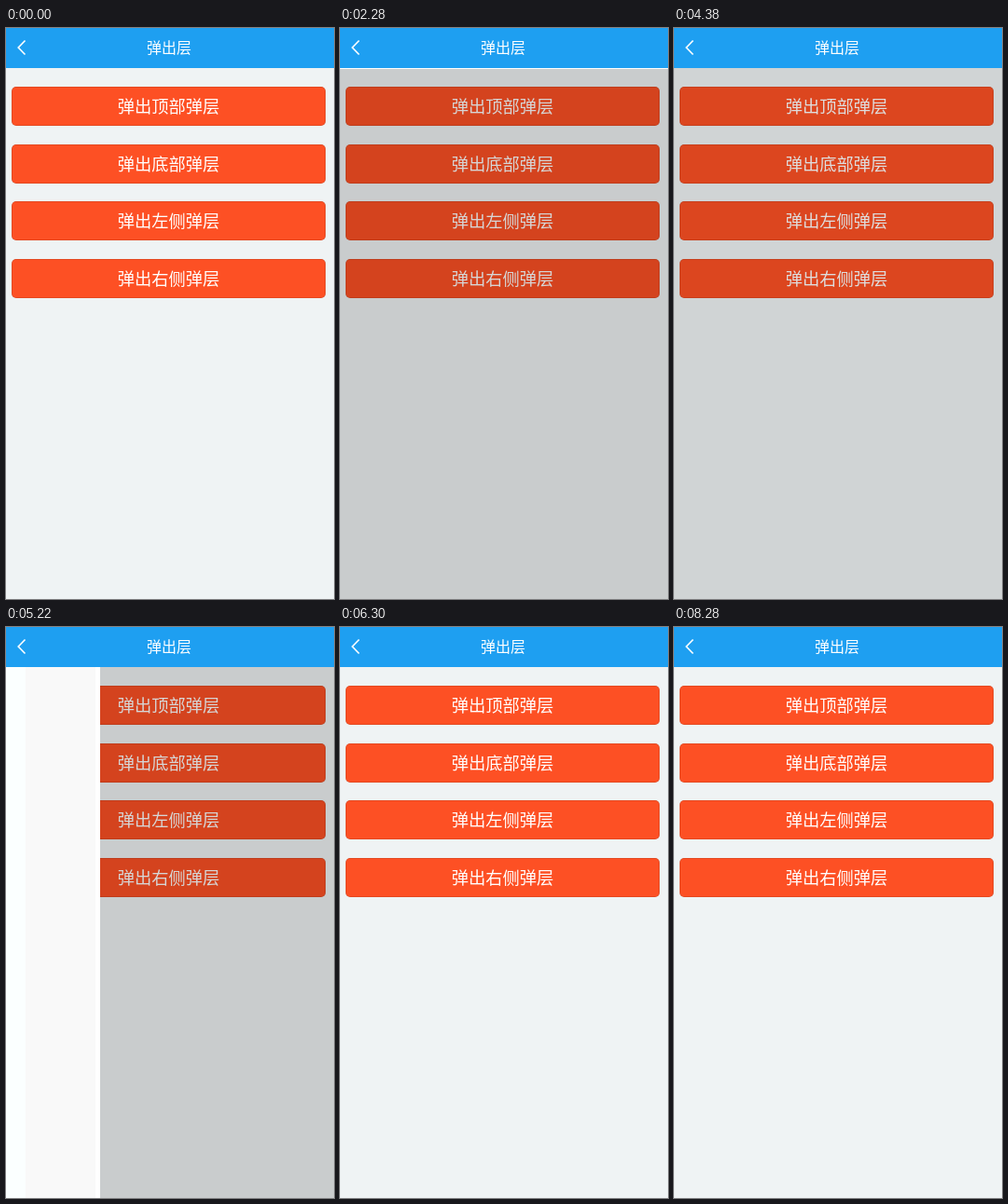
These frames come from a looping animation (352x613 px, 8.58 s). An HTML page:

```html
<!DOCTYPE html>
<html lang="zh-CN">
<head>
<meta charset="utf-8">
<title>弹出层</title>
<style>
  html, body { margin: 0; width: 100%; height: 100%; overflow: hidden; }
  body {
    position: relative;
    background: #eff3f4;
    color: #fff;
    font-family: "Noto Sans CJK SC", "Noto Sans CJK", "Noto Sans", sans-serif;
  }
  header {
    position: absolute; left: 0; top: 0; width: 352px; height: 43px;
    background: #1e9ff1;
    font-size: 16px; font-weight: 500; line-height: 43px;
  }
  header span { position: absolute; left: 151px; top: -1px; white-space: nowrap; }
  header svg { position: absolute; left: 0; top: 0; }
  .btn {
    position: absolute; left: 6px; width: 337px; height: 42px;
    border-radius: 5px;
    background: #fd5024;
    box-shadow: inset 0 0 0 .5px rgba(0, 0, 0, .2);
    font-size: 18.3px; font-weight: 300; line-height: 41px;
    text-align: center; white-space: nowrap;
  }
  #mask, .panel { position: absolute; left: 0; top: 43px; width: 352px; height: 570px; }
  #mask { background: #000; opacity: 0; }
  .panel { background: #fff; }
  .top {
    height: 404px;
    background: linear-gradient(#fff 73px, #f7faf9 73px 135px, #fffff8 135px 241px, #fff 241px);
  }
  .bottom { top: 209px; height: 404px; }
  .left {
    width: 246px;
    background: linear-gradient(90deg, #fbffff 21px, #f9f9f9 21px 96px, #fff 96px);
  }
  .right { left: 106px; width: 246px; }
  .tap {
    position: absolute; width: 26px; height: 26px; margin: -13px;
    border-radius: 50%;
    background: rgba(255, 255, 255, .35);
    opacity: 0;
  }
</style>
</head>
<body>
<header>
  <svg width="30" height="43" fill="none" stroke="#fff" stroke-width="1.6"><path d="M20.5 13.5 13.2 21 20.5 28.5"/></svg>
  <span>弹出层</span>
</header>
<script>
const LOOP = 8580, OPEN = 300, CLOSE = 270, FADE = 60, DIM = 0.16;

// side, hidden clip, opening start, closing start
const popups = [
  ['top', 'inset(0 0 100% 0)', 750, 2020],
  ['bottom', 'inset(100% 0 0 0)', 3060, 4100],
  ['left', 'inset(0 100% 0 0)', 5087, 5960],
  ['right', 'inset(0 0 0 100%)', 6840, 7800],
];

// x, y, shown, hidden
const taps = [
  [180.5, 86.5, 540, 690],
  [149.5, 547.5, 1860, 2070],
  [173, 148.5, 3930, 4110],
  [169.5, 212.5, 4890, 5040],
];

function add(className, text = '') {
  const el = document.createElement('div');
  el.className = className;
  el.textContent = text;
  return document.body.appendChild(el);
}

// steps: [time, value, easing towards the next step]
function play(el, prop, steps) {
  const frames = steps.map(([t, value, easing = 'linear']) =>
    ({ offset: t / LOOP, [prop]: value, easing }));
  const anim = el.animate(frames, { duration: LOOP, iterations: Infinity });
  anim.startTime = 0;
  return anim;
}

['顶部', '底部', '左侧', '右侧'].forEach((side, i) => {
  add('btn', `弹出${side}弹层`).style.top = `${62.8 + i * 61.75}px`;
});

const mask = add('');
mask.id = 'mask';
const anims = [play(mask, 'opacity', [
  [0, 0],
  ...popups.flatMap(([, , open, close]) => [
    [open - FADE, 0], [open, DIM],
    [close + CLOSE, DIM], [close + CLOSE + FADE, 0],
  ]),
  [LOOP, 0],
])];

for (const [side, hidden, open, close] of popups) {
  const shown = 'inset(0 0 0 0)';
  anims.push(play(add(`panel ${side}`), 'clipPath', [
    [0, hidden],
    [open, hidden, 'ease-in-out'], [open + OPEN, shown],
    [close, shown, 'ease-in-out'], [close + CLOSE, hidden],
    [LOOP, hidden],
  ]));
}

for (const [x, y, on, off] of taps) {
  const dot = add('tap');
  dot.style.left = `${x}px`;
  dot.style.top = `${y}px`;
  anims.push(play(dot, 'opacity', [
    [0, 0], [on, 0], [on, 1], [off, 1], [off, 0], [LOOP, 0],
  ]));
}

// All tracks share one clock that starts with the page.
const start = document.timeline.currentTime ?? 0;
for (const anim of anims) anim.startTime = start;
</script>
</body>
</html>
```
